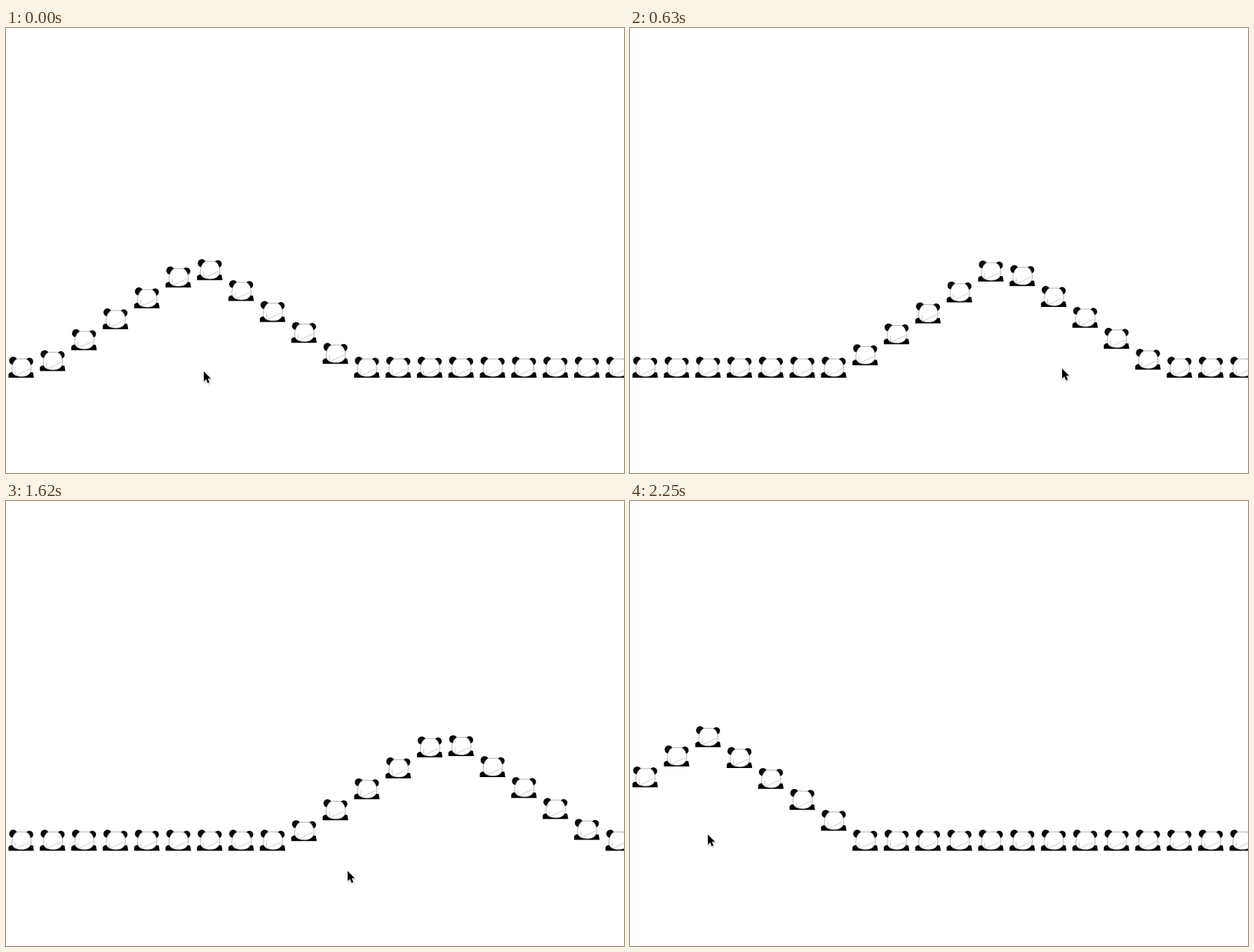
An HTML page for the animation above (2.43 s loop, 881 by 635 pixels).

```html
<!DOCTYPE html>
<html lang="en">
<head>
<meta charset="utf-8">
<title>Panda wave</title>
<style>
  html, body { margin: 0; width: 100%; height: 100%; overflow: hidden; background: #fff; }
  svg { display: block; position: absolute; left: 0; top: 0; }
</style>
</head>
<body>
<svg width="881" height="635" viewBox="0 0 881 635">
  <defs>
    <g id="panda">
      <path d="M0 30V25Q1.5 22 5 22H31L35 22.5L36.3 30Z" fill="#000"/>
      <circle cx="6.8" cy="5.9" r="5.8" fill="#0a0a0a"/>
      <circle cx="29.9" cy="6.9" r="5.4" fill="#0a0a0a"/>
      <path d="M12.5 3.2H24.5C29.5 4.5 32.4 11 32.4 17C32.4 24.5 27 28.4 19 28.4C10 28.4 4.8 25 4.8 18.5C4.8 10.5 8.5 4.5 12.5 3.2Z"
            fill="#fff" stroke="#777" stroke-width=".6"/>
      <path d="M9.6 18V26.5M10 27L31 17.2" fill="none" stroke="#aaa" stroke-width=".6"/>
    </g>
    <filter id="shade" x="-50%" y="-50%" width="200%" height="200%">
      <feDropShadow dx="0" dy="1" stdDeviation="1" flood-color="#000" flood-opacity=".35"/>
    </filter>
  </defs>
  <g id="row"></g>
  <path id="arrow" d="M0 0V14.2L3.2 11.3L5.6 16.8L8.2 15.7L5.8 10.3H10.2Z"
        fill="#000" stroke="#fff" stroke-width="1.2" paint-order="stroke" filter="url(#shade)"/>
</svg>
<script>
const TICK = 90, LOOP = 2430;
const COUNT = 20, PITCH = 44.8, LEFT = 3.5, HALF = 18, BASE = 469;
const PEAK = 149, SLOPE = 2 / 3;
const LAG = 0.8, OFFSET = -1.6; // the crest trails the pointer

const linear = u => u;
const easeIn = p => u => u ** p;
const easeOut = p => u => 1 - (1 - u) ** p;

// Pointer strokes, timed in ticks; bow bends the path vertically.
const home = { x: 277.3, y: 490 };
const strokes = [
  { from: -0.8, to: 0, x: 282, y: 490, ease: linear, bow: 0 },
  { from: 2, to: 3, x: 326, y: 482, ease: linear, bow: 0 },
  { from: 3, to: 7, x: 616, y: 486, ease: easeIn(1.5), bow: 0 },
  { from: 10.2, to: 14.2, x: 892, y: 494, ease: easeOut(2.75), bow: -18 },
  { from: 14.2, to: 18, x: 487, y: 528, ease: easeIn(1.83), bow: 0 },
  { from: 20.2, to: 24.2, x: 111, y: 476, ease: easeOut(1.43), bow: -24 }
];

function pointer(tick) {
  let { x, y } = home;
  for (const s of strokes) {
    const u = Math.min(1, (tick - s.from) / (s.to - s.from));
    if (u <= 0) break;
    const k = s.ease(u);
    x += (s.x - x) * k;
    y += (s.y - y) * k + s.bow * Math.sin(Math.PI * u);
  }
  return { x, y };
}

const row = document.getElementById('row');
const arrow = document.getElementById('arrow');
const place = (el, x, y) => el.setAttribute('transform', `translate(${x} ${y})`);

const pandas = Array.from({ length: COUNT }, () => {
  const el = document.createElementNS('http://www.w3.org/2000/svg', 'use');
  el.setAttribute('href', '#panda');
  return row.appendChild(el);
});

function render(ms) {
  const tick = Math.floor((ms % LOOP) / TICK);
  const crest = pointer(tick - LAG).x + OFFSET;
  pandas.forEach((el, i) => {
    const left = LEFT + i * PITCH;
    const lift = Math.max(0, PEAK - SLOPE * Math.abs(left + HALF - crest));
    place(el, left, BASE - lift);
  });
  const { x, y } = pointer(tick);
  place(arrow, x, y);
}

const start = performance.now();
function loop() {
  render(performance.now() - start);
  requestAnimationFrame(loop);
}
loop();
</script>
</body>
</html>
```
